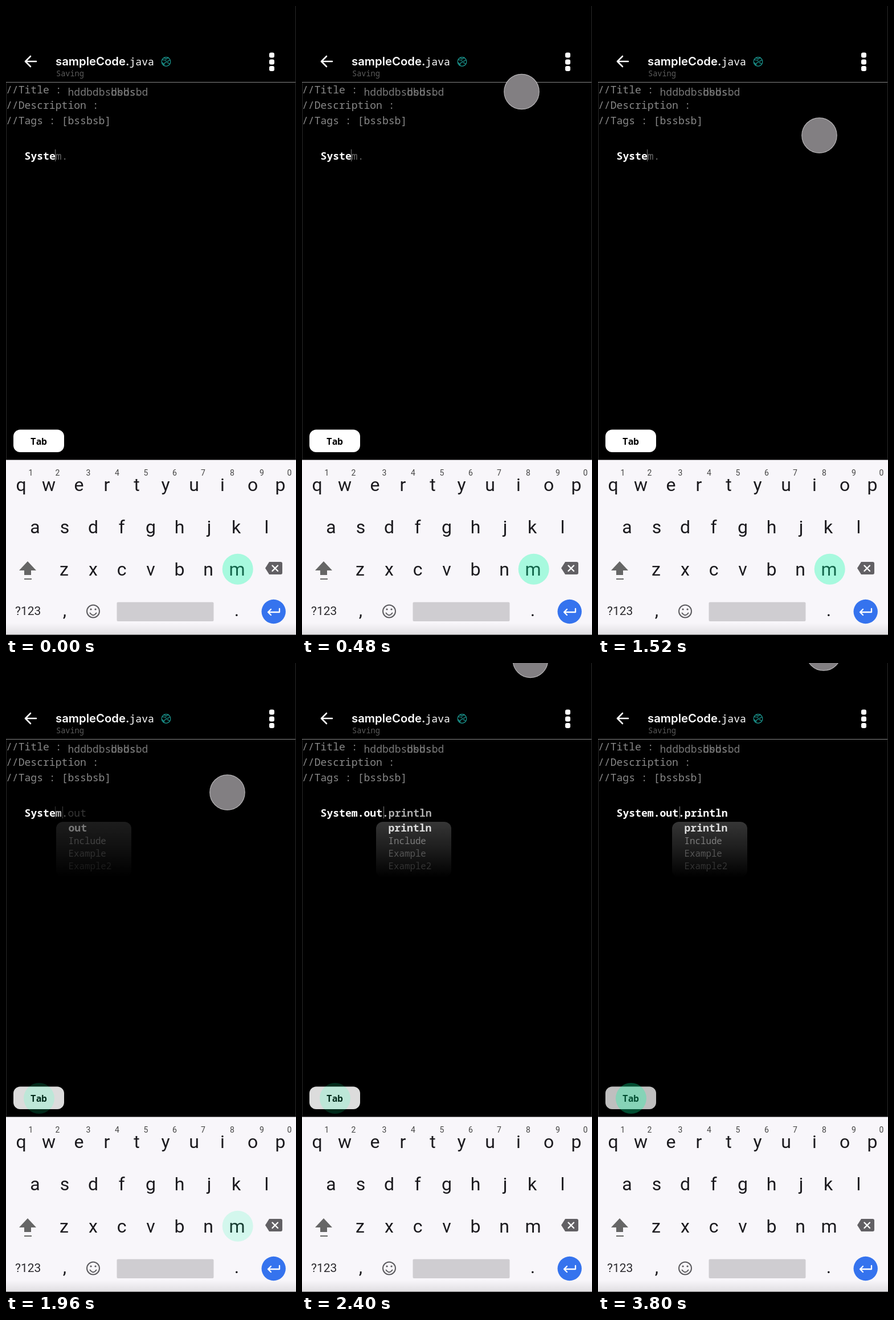
Write an HTML page that moves like this. It is 509x1101 px and loops after 3.88 s.

```html
<!DOCTYPE html>
<html lang="en">
<head>
<meta charset="utf-8">
<title>Code editor autocomplete</title>
<style>
  html, body { margin: 0; height: 100%; overflow: hidden; background: #000; }
  svg { display: block; width: 509px; height: 1101px; }
  text { white-space: pre; }
  .code { font: 18.07px "Noto Sans Mono", monospace; fill: #888; }
  .bold { font-weight: 600; fill: #fff; }
  .ghost { fill: #666; }
  .menu { font: 15.8px "Noto Sans Mono", monospace; }
  .key { font: 32px Roboto, sans-serif; fill: #1b1a1e; text-anchor: middle; }
  .digit { font-size: 14px; fill: #444; }
  .line { fill: none; stroke-linecap: round; stroke-linejoin: round; }
  .press { fill: #00ffa3; fill-opacity: .33; }
</style>
</head>
<body>
<svg viewBox="0 0 509 1101">
  <defs>
    <linearGradient id="fade" x2="0" y2="1">
      <stop stop-color="#fff" stop-opacity=".21"/>
      <stop offset=".5" stop-color="#fff" stop-opacity=".11"/>
      <stop offset="1" stop-color="#fff" stop-opacity="0"/>
    </linearGradient>
    <linearGradient id="shade" x2="0" y2="1">
      <stop stop-opacity="0"/>
      <stop offset="1" stop-opacity=".1"/>
    </linearGradient>
    <g id="menu">
      <rect width="132" height="97" rx="12" fill="url(#fade)"/>
      <g class="menu">
        <text x="21.5" y="39" fill="#7c7c7c">Include</text>
        <text x="21.5" y="61" fill="#565656">Example</text>
        <text x="21.5" y="82.5" fill="#333">Example2</text>
      </g>
    </g>
  </defs>
  <rect width="509" height="1101"/>

  <!-- header -->
  <path class="line" d="M53 97H35M43 88L34 97L43 106" stroke="#fff" stroke-width="2.6"/>
  <text x="87" y="104" font-family="Inter, sans-serif" font-size="20.3" font-weight="600" fill="#fff">sampleCode.</text>
  <text class="code bold" x="216.5" y="104" style="font-weight:500">java</text>
  <text x="88" y="123" font-family="'Noto Sans Mono', monospace" font-size="13.6" fill="#5c5c5c">Saving</text>
  <g class="line" stroke="#1c9c95" stroke-width="1.2">
    <circle cx="281" cy="97.5" r="7.8"/>
    <path d="M274 94L280 95L282 98L278 100L277 104M278 91L281 93L285 90M288 95L284 96L284 100L287 101M274 99L277 102"/>
  </g>
  <g fill="#fff">
    <rect x="462" y="81.500" width="9" height="9" rx="3"/>
    <rect x="462" y="93.500" width="9" height="9" rx="3"/>
    <rect x="462" y="105" width="9" height="9" rx="3"/>
  </g>
  <rect y="133" width="509" height="1" fill="#858585"/>

  <!-- code -->
  <g class="code">
    <text x="0" y="153">//Title :</text>
    <text x="108.5" y="157" fill="#777">hddbdbsbsbsbd</text>
    <text x="184" y="157" fill="#777">dbds.</text>
    <text x="0" y="180">//Description :</text>
    <text x="0" y="207">//Tags : [bssbsb]</text>
  </g>
  <g id="typed" class="code"></g>
  <g data-level="first">
    <use href="#menu" x="88" y="278"/>
    <text class="code bold" x="109.5" y="295" style="fill:#dedede">out</text>
  </g>
  <g data-level="second">
    <use href="#menu" x="130" y="278"/>
    <text class="code bold" x="151.5" y="295" style="fill:#dedede">println</text>
  </g>

  <!-- tab button -->
  <rect x="13" y="741.500" width="89" height="39.500" rx="12" fill="#fff"/>
  <text x="57.5" y="767.5" text-anchor="middle" font-family="'Noto Sans Mono', monospace" font-size="16" font-weight="700">Tab</text>
  <g data-level="tab">
    <rect x="13" y="741.500" width="89" height="39.500" rx="12" fill-opacity=".25"/>
    <circle class="press" cx="58" cy="762" r="27" style="fill-opacity:.3"/>
  </g>

  <!-- keyboard -->
  <rect y="794.500" width="509" height="306.500" fill="#f8f6fa"/>
  <rect y="1080" width="509" height="21" fill="url(#shade)"/>
  <rect y="1100" width="509" height="1" fill="#777"/>
  <g id="keys" class="key"></g>
  <text x="16" y="1066" font-family="Roboto, sans-serif" font-size="21" fill="#2b2a2e">?123</text>
  <path d="M38 972L53 988H44V996H32V988H23Z" fill="#666"/>
  <rect x="32" y="1002" width="13" height="2" fill="#666"/>
  <path d="M462 973H482Q485 973 485 976V992Q485 995 482 995H462L455 984Z" fill="#626064"/>
  <path class="line" d="M467.5 979.5L477 989M477 979.5L467.5 989" stroke="#fff" stroke-width="2.4"/>
  <g class="line" stroke="#5c5b5f" stroke-width="2">
    <circle cx="153" cy="1059.5" r="11"/>
    <path d="M147.5 1062.5Q153 1070 158.5 1062.5"/>
    <path d="M149 1056h.1M157 1056h.1" stroke-width="3.2"/>
  </g>
  <rect x="194.500" y="1043.500" width="170" height="33.500" rx="2" fill="#cfcdd1"/>
  <circle cx="469.700" cy="1060" r="21.200" fill="#3573ee"/>
  <path class="line" d="M480 1055V1061H460M465 1056L460 1061L465 1066" stroke="#fff" stroke-width="2.3"/>
  <circle class="press" data-level="letter" cx="406.700" cy="985.700" r="27"/>
  <path d="M.5 134V794M508.5 0V794" stroke="#2a2a2a"/>

  <circle id="touch" r="30.700" fill="#827f82" stroke="#b4b2b4" stroke-width="1.2"/>
</svg>
<script>
const LOOP = 3880;
const STEP = 220;        // length of one dissolve
const DISSOLVES = 1840;  // when the first one starts
const byId = id => document.getElementById(id);

function add(parent, tag, attrs, label = '') {
  const el = document.createElementNS('http://www.w3.org/2000/svg', tag);
  for (const name in attrs) el.setAttribute(name, attrs[name]);
  el.textContent = label;
  parent.append(el);
}

// Code line: column, text, style, level that reveals it
const typed = byId('typed');
for (const [column, label, style, level] of [
  [0, 'Syste', 'bold', 'full'], [5, 'm.', 'ghost', 'full'],
  [7, 'out', 'ghost', 'p1'], [10, '.println', 'ghost', 'p2'],
  [5, 'm', 'bold', 'p1'], [6, '.out', 'bold', 'p2'], [10, '.println', 'bold', 'p3'],
]) add(typed, 'text', { x: 32.6 + column * 10.84, y: 269, class: style, 'data-level': level }, label);
for (const [x, level] of [[86, 'letter'], [99, 'first'], [143, 'second']])
  add(typed, 'rect', { x, y: 251, width: 1, height: 21, fill: '#777', 'data-level': level });

const keys = byId('keys');
const addRow = (letters, y, centers) => [...letters].forEach((letter, i) =>
  add(keys, 'text', { x: centers[i], y }, letter));
addRow('qwertyuiop', 849, [26.5, 75, 128, 177, 229.5, 280, 330, 380, 433, 481.5]);
addRow('asdfghjkl', 922.5, [51, 103, 153, 203, 254, 304.5, 356.5, 404, 457.5]);
addRow('zxcvbnm', 997, [102, 153, 203, 254, 304.5, 355, 405.5]);
addRow(',.', 1068, [103, 405]);
[43.5, 90.5, 144.5, 195, 245.5, 296, 346, 397, 449, 497.5].forEach((x, i) =>
  add(keys, 'text', { x, y: 822, class: 'digit' }, (i + 1) % 10));

// Pointer path: time, x, y
const path = [
  [200, 380, -34], [480, 385.5, 150], [640, 388, 205], [900, 388.5, 226.5],
  [2080, 388.5, 226.5], [2200, 401, 109.5], [2240, 403, 69], [2360, 401, -4],
  [2720, 399.5, -14.5], [3400, 396, -17.5], [LOOP, 396, -17.5],
];
const clamp = v => Math.min(1, Math.max(0, v));
const touch = byId('touch');
const layers = document.querySelectorAll('[data-level]');

function draw(t) {
  const [p1, p2, p3] = [0, 1, 2].map(i => clamp((t - DISSOLVES - i * STEP) / STEP));
  const levels = {
    full: 1, p1, p2, p3,
    letter: 1 - p1, first: p1 - p2, second: p2, tab: p1 - p2 + p3,
  };
  for (const el of layers) el.style.opacity = levels[el.dataset.level];

  const next = Math.max(1, path.findIndex(point => point[0] > t));
  const [t0, x0, y0] = path[next - 1], [t1, x1, y1] = path[next];
  const k = clamp((t - t0) / (t1 - t0));
  touch.setAttribute('cx', x0 + (x1 - x0) * k);
  touch.setAttribute('cy', y0 + (y1 - y0) * k);
}

let start;
function tick(now) {
  start ??= now;
  draw((now - start) % LOOP);
  requestAnimationFrame(tick);
}
draw(0);
requestAnimationFrame(tick);
</script>
</body>
</html>
```
